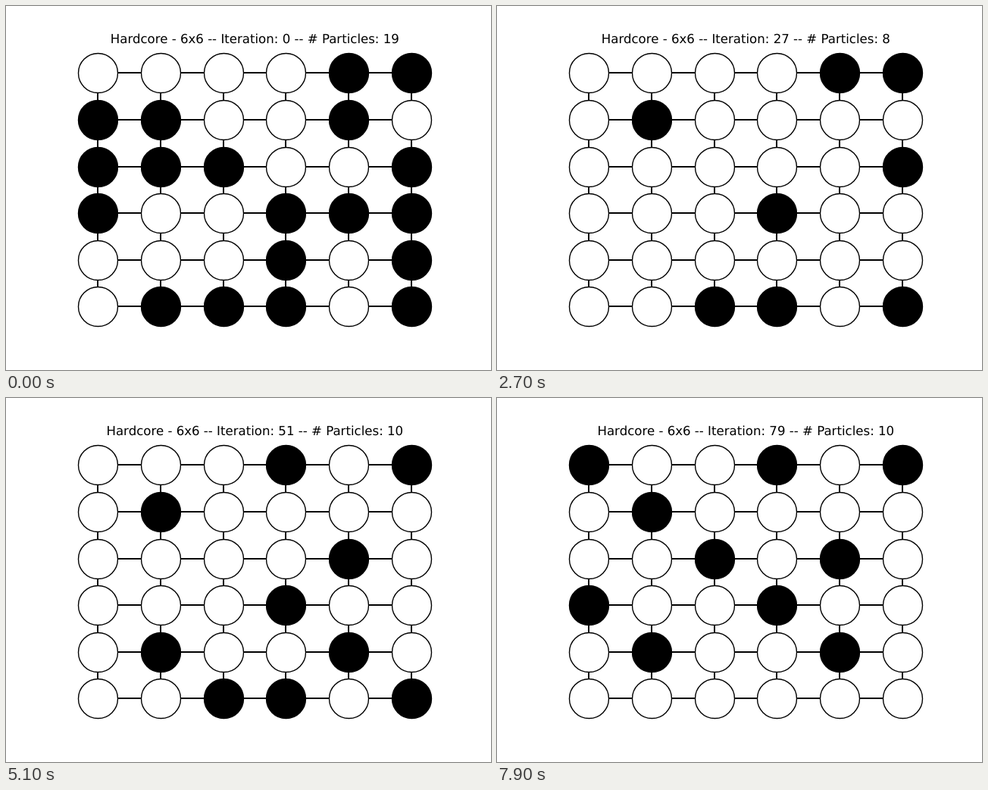
Write an HTML page that moves like this. It is 640 by 480 pixels and loops after 8 s.

```html
<!DOCTYPE html>
<html lang="en">
<head>
<meta charset="utf-8">
<title>Hardcore model</title>
<style>
  html, body { margin: 0; height: 100%; overflow: hidden; background: #fff; }
  svg { display: block; }
  text { font: 16.6px "DejaVu Sans", sans-serif; text-anchor: middle; text-rendering: geometricPrecision; }
  line { stroke: #000; stroke-width: 2; }
  circle { stroke: #000; stroke-width: 1.39; }
</style>
</head>
<body>
<svg id="stage" width="640" height="480" viewBox="0 0 640 480"><text id="title" x="328.3" y="49"></text></svg>
<script>
const N = 6, STEP = 100, STEPS = 80;

// Sites are named 0-9, a-z in reading order.
const SITES = [...'0123456789abcdefghijklmnopqrstuvwxyz'];
const START = '4567acdehilmnrtvwxz';

// Each phase toggles its sites one by one, evenly spread over its iterations.
const PHASES = [
  { from: 0, to: 16, sites: '6dmernt' },
  { from: 19, to: 27, sites: 'cavi' },
  { from: 28, to: 36, sites: 'hpsg' },
  { from: 37, to: 41, sites: '43' },
  { from: 55, to: 61, sites: 'xiwz' },
  { from: 64, to: 80, sites: '0e' }
];

const stage = document.getElementById('stage');
const title = document.getElementById('title');
const colX = i => Math.floor(121.4 + 82.8 * i);
const rowY = i => Math.floor(88.8 + 61.6 * i);

function add(tag, attrs) {
  const el = document.createElementNS('http://www.w3.org/2000/svg', tag);
  for (const key in attrs) el.setAttribute(key, attrs[key]);
  return stage.appendChild(el);
}

for (let i = 0; i < N; i++) {
  add('line', { x1: colX(0), x2: colX(N - 1), y1: rowY(i), y2: rowY(i) });
  add('line', { x1: colX(i), x2: colX(i), y1: rowY(0), y2: rowY(N - 1) });
}
const nodes = SITES.map((_, k) =>
  add('circle', { cx: colX(k % N) + 0.5, cy: rowY(Math.floor(k / N)) + 0.5, r: 26 }));

function particlesAt(iteration) {
  const particles = new Set(START);
  for (const { from, to, sites } of PHASES) {
    const gap = (to - from) / sites.length;
    const done = Math.max(0, Math.floor((iteration - from) / gap + 0.5));
    for (const site of sites.slice(0, done)) {
      if (!particles.delete(site)) particles.add(site);
    }
  }
  return particles;
}

function draw(iteration) {
  const particles = particlesAt(iteration);
  nodes.forEach((node, k) => node.setAttribute('fill', particles.has(SITES[k]) ? '#000' : '#fff'));
  title.textContent = `Hardcore - 6x6 -- Iteration: ${iteration} -- # Particles: ${particles.size}`;
}

let origin;
function tick(now) {
  origin ??= now;
  draw(Math.floor((now - origin) / STEP) % STEPS);
  requestAnimationFrame(tick);
}
draw(0);
requestAnimationFrame(tick);
</script>
</body>
</html>
```
